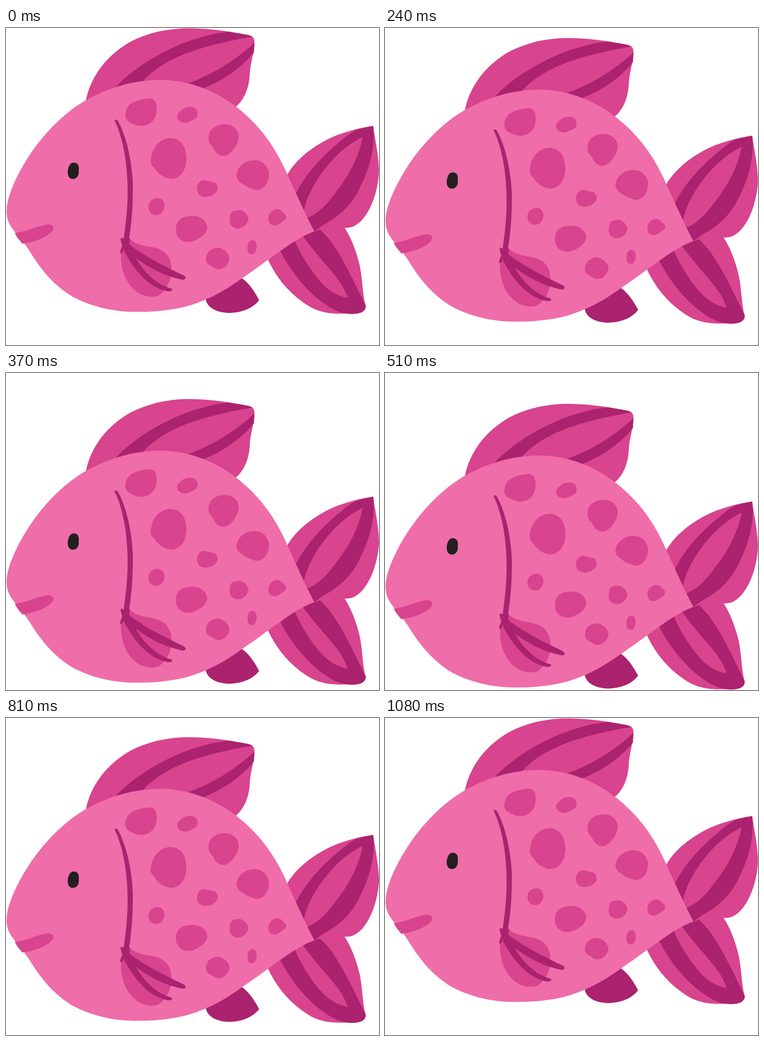
Write an HTML page that moves like this. It is 641 px wide and 544 px high and loops after 1110 ms.

```html
<!DOCTYPE html>
<html lang="en">
<head>
<meta charset="utf-8">
<title>Bobbing fish</title>
<style>
  html, body { margin: 0; width: 100%; height: 100%; overflow: hidden; background: #fff; }
  svg { display: block; width: 641px; height: 544px; overflow: hidden; }
  .body { fill: #ef6da9; }
  .fin { fill: #d8448e; }
  .dark { fill: #ab226f; }
  .eye { fill: #231f20; }
</style>
</head>
<body>
<svg viewBox="0 0 641 544">
  <g id="fish">
    <!-- dorsal fin -->
    <path class="fin" d="M137 126C145 82 175 45 215 23C252 4 290 0 320 .5C355 1 390 7 416 12C425 14 427 18 427 25C426 45 420 60 419 78C418 105 408 125 394 136L300 180L180 160Z"/>
    <path class="dark" d="M188 102C215 72 262 42 310 24C345 12 365 8 384 6.5L416 12L424 15L418 16C370 24 320 37 288 53C259 67 241 83 228 100Z"/>
    <path class="dark" d="M427 25C398 53 352 82 312 95L337 104C371 92 405 68 426 42Z"/>

    <!-- tail -->
    <path class="fin" d="M483 252C497 227 525 204 559 188C584 177 610 171 631 168C634 190 640 215 641 245C640 280 625 325 600 339C595 342 588 343 582 343L530 349L470 330Z"/>
    <path class="fin" d="M450 397C465 430 490 460 525 480C545 490 565 491 585 490C605 492 618 486 618 477C612 455 613 425 606 400C600 378 592 358 582 343L530 340L470 350Z"/>
    <path class="dark" d="M498 284C515 250 545 218 575 194C587 184 595 178 604 174L631 168C635 205 625 240 610 270C595 305 570 325 545 338L530 349L490 330Z"/>
    <path class="fin" d="M512 313C517 289 531 261 556 232C574 211 593 197 613 187C606 222 590 252 569 279C553 301 537 319 517 326L500 320Z"/>
    <path class="dark" d="M471 382C490 420 520 455 550 475C562 483 575 490 590 490.5C610 492 620 485 618 476C600 440 580 395 555 362L540 346L530 349L480 360Z"/>
    <path class="fin" d="M497 367C505 385 520 412 540 435C555 452 570 460 587 463C580 440 565 424 548 404C533 387 521 372 510 357L500 350Z"/>

    <!-- belly fin -->
    <path class="dark" d="M343 464C345 480 362 489 385 489C408 488 425 480 435 467C427 452 418 438 405 429Z"/>

    <path class="body" d="M530 349C516 323 500 287 483 250C461 200 434 165 394 134C356 105 310 89 265 89C218 89 175 103 137 124C100 145 63 183 38 222C18 253 1 290 1 314C1 335 11 344 22 358C31 369 38 378 45 390C62 417 85 444 116 462C155 482 195 488 230 487C275 487 312 480 343 466C365 457 385 444 405 430C421 419 436 408 450 398C474 381 500 360 530 349Z"/>

    <!-- spots -->
    <g class="fin">
      <path d="M213 131C225 123 240 121 250 121C258 124 259 132 259 142C258 152 254 160 245 165C238 169 228 169 222 166C214 163 206 160 205 151C205 142 208 136 213 131Z"/>
      <path d="M300 142C306 136 314 134 321 136C329 138 331 147 328 153C324 158 317 159 312 162C305 164 294 160 294 152C294 147 297 145 300 142Z"/>
      <path d="M348 188C349 172 362 165 377 165C390 166 400 174 400 187C399 200 389 214 378 219C366 222 358 212 356 205C350 200 348 195 348 188Z"/>
      <path d="M249 225C251 203 266 189 283 189C302 190 310 205 310 224C310 245 299 259 283 259C268 257 258 246 255 240C250 236 248 232 249 225Z"/>
      <path d="M396 252C398 238 408 231 418 228C435 224 448 231 452 248C453 265 443 279 429 278C420 275 412 272 406 267C399 263 396 258 396 252Z"/>
      <path d="M328 276C329 266 333 262 341 261C348 262 350 264 355 264C362 265 365 272 363 279C358 287 351 289 344 290C333 290 329 285 328 276Z"/>
      <path d="M245 304C247 295 254 292 262 292C270 293 273 301 272 308C270 317 264 321 257 321C248 320 244 313 245 304Z"/>
      <path d="M292 346C292 330 302 324 314 323C330 320 345 328 346 343C344 354 334 360 326 364C314 370 302 367 296 359C293 355 292 350 292 346Z"/>
      <path d="M385 324C385 315 391 313 397 313C405 310 415 318 417 328C414 338 408 343 400 344C393 345 390 341 387 339C384 335 384 330 385 324Z"/>
      <path d="M451 325C453 315 460 311 467 311C474 312 475 317 479 319C483 323 482 328 477 331C471 335 467 339 461 339C453 338 450 332 451 325Z"/>
      <path d="M415 377C415 369 418 364 424 364C430 365 432 372 430 380C428 387 425 389 421 388C416 387 415 383 415 377Z"/>
      <path d="M344 393C346 382 355 377 366 377C376 380 385 388 384 398C381 407 374 414 366 414C358 414 355 409 350 407C344 404 343 399 344 393Z"/>
    </g>

    <!-- side fin and gill -->
    <path class="fin" d="M209 355C214 368 228 372 245 375C270 378 283 390 284 410C286 430 277 450 262 459C245 465 225 458 212 440C200 423 195 400 199 380Z"/>
    <g class="dark">
      <path d="M187 160C200 185 209 230 209 280C209 315 205 340 202 364L199 376C196 382 195 388 198 387C202 384 203 378 205 374L211 364C217 330 218 300 218 270C217 230 207 185 192 159C190 156 186 157 187 160Z"/>
      <path d="M197 361C199 359 202 361 204 365C232 389 270 408 306 425C311 429 309 432 303 432C265 424 232 404 207 381C200 378 197 366 197 361Z"/>
      <path d="M203 370L212 372C226 406 250 438 284 447C288 450 284 452 279 452C245 446 220 415 203 383Z"/>
      <path d="M203 364L213 361L211 377L203 380Z"/>
    </g>

    <!-- face -->
    <path class="fin" d="M15 352C35 350 55 339 72 337C82 337 84 344 78 350C68 361 45 368 28 370C22 363 18 358 15 352Z"/>
    <path class="eye" d="M116 231C124 231 126 237 125 244C126 254 121 259 115 259C108 259 106 253 106 246C107 238 110 231 116 231Z"/>
  </g>
</svg>
<script>
  const LOOP = 1110, STEPS = 33, STEP_MS = 33.75, DROP = 53, PULL = 0.61;
  const fish = document.getElementById('fish');

  // Symmetric ease in and out: cubic-bezier(PULL, 0, 1 - PULL, 1)
  function ease(x) {
    let lo = 0, hi = 1;
    for (let k = 0; k < 30; k++) {
      const s = (lo + hi) / 2, r = 1 - s;
      const bx = 3 * s * r * r * PULL + 3 * s * s * r * (1 - PULL) + s * s * s;
      if (bx < x) lo = s; else hi = s;
    }
    return lo * lo * (3 - 2 * lo);
  }

  // Steps begin on whole hundredths of a second
  function stepAt(ms) {
    return Math.floor((Math.floor(ms / 10) + 0.5) / (STEP_MS / 10));
  }

  function draw(ms) {
    const phase = 2 * stepAt(ms % LOOP) / STEPS;
    const y = DROP * ease(phase < 1 ? phase : 2 - phase);
    fish.setAttribute('transform', `translate(0 ${y.toFixed(2)})`);
  }

  const start = performance.now();
  function tick() {
    draw(performance.now() - start);
    requestAnimationFrame(tick);
  }
  tick();
</script>
</body>
</html>
```
